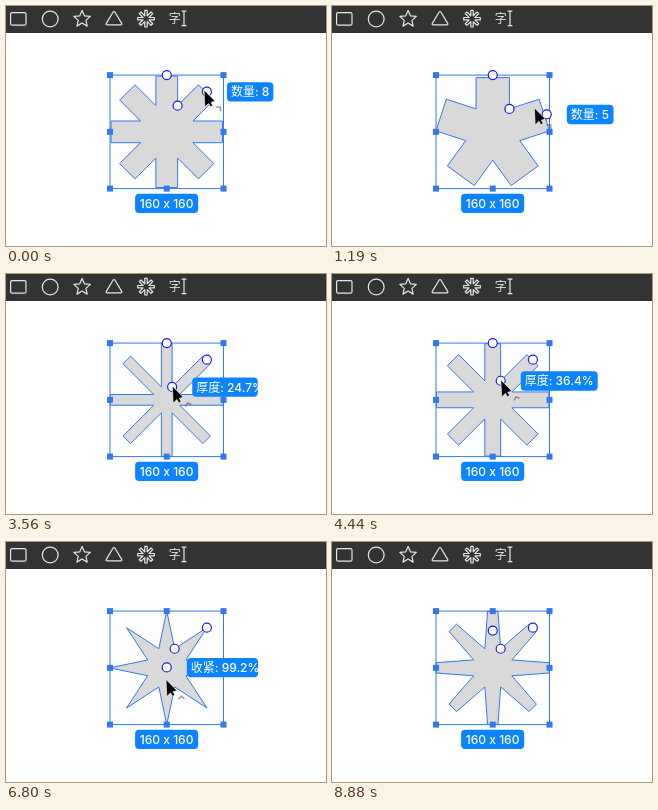
An HTML page for the animation above (9.19 s loop, 320 by 240 pixels).

```html
<!DOCTYPE html>
<html lang="zh">
<head>
<meta charset="utf-8">
<title>Asterisk shape handles</title>
<style>
  html, body { margin: 0; width: 100%; height: 100%; overflow: hidden; background: #fff; }
  svg { display: block; width: 320px; height: 240px; }
  text { font: 500 12px Inter, "Noto Sans CJK SC", "Noto Sans CJK", sans-serif; fill: #fff; }
  .tools { fill: none; stroke: #e6e6e6; stroke-width: 1.2; stroke-linejoin: round; }
  .tools text { font-size: 12px; fill: #e6e6e6; stroke: none; }
  .shape { fill: #d9d9d9; stroke: #3378f0; }
  .frame { fill: none; stroke: #3378f0; }
  .square { fill: #3378f0; }
  .knob { fill: #fff; stroke: #1c1ce8; stroke-width: 1.2; }
  .tag { fill: #0d84ff; }
  .arrow { fill: #000; stroke: #fff; stroke-width: .6; }
  .mark { fill: none; stroke: #444; stroke-width: 1.5; }
</style>
</head>
<body>
<svg viewBox="0 0 320 240">
  <rect width="320" height="27" fill="#333"/>
  <g class="tools">
    <rect x="4.6" y="6.6" width="15.4" height="12.6" rx="1.5"/>
    <circle cx="44.2" cy="13" r="7.9"/>
    <path id="star"/>
    <path d="M107 6.2Q108 4.8 109 6.2L115.7 17.4Q116.3 18.8 114.8 18.8H101.2Q99.7 18.8 100.3 17.4Z"/>
    <path id="burst"/>
    <text x="162.8" y="17">字</text>
    <path d="M175.6 5.2H180.4M178 5.2V19.6M175.6 19.6H180.4"/>
  </g>
  <path id="shape" class="shape"/>
  <rect class="frame" x="104" y="69.1" width="113.5" height="113.5"/>
  <g id="squares"></g>
  <rect class="tag" x="129.1" y="187.7" width="63.1" height="19.4" rx="4"/>
  <text x="160.6" y="202" text-anchor="middle">160 x 160</text>
  <g id="tip">
    <rect id="tipBox" class="tag" height="19.4" rx="4"/>
    <text id="tipText" x="4" y="14.2"></text>
  </g>
  <g id="knobs"></g>
  <g id="cursor">
    <path class="arrow" d="M0 0L.8 17L4.6 13.4L6.6 16.8L8.7 15.6L7 12.2L11 11.2Z"/>
    <path id="mark" class="mark"/>
  </g>
</svg>
<script>
const LOOP = 9190, STEP = 147.6, LAST = 60;
const CX = 160.75, CY = 125.85, R = 56.75;
const $ = id => document.getElementById(id);
const set = (el, attrs) => { for (const k in attrs) el.setAttribute(k, attrs[k]); };
const add = (parent, name, attrs) => {
  const el = document.createElementNS(parent.namespaceURI, name);
  set(el, attrs);
  return parent.appendChild(el);
};
const polar = (r, a, x = CX, y = CY) => [x + r * Math.sin(a), y - r * Math.cos(a)];
const toPath = points => 'M' + points.map(p => p.map(v => v.toFixed(2))).join('L') + 'Z';

function asterisk(n, thick, tight, x = CX, y = CY, radius = R) {
  const inner = radius * thick, half = Math.PI / n;
  const spread = Math.asin(inner * Math.sin(half) * (1 - tight) / radius);
  const points = [];
  for (let i = 0; i < n; i++) {
    const a = 2 * half * i;
    points.push(polar(radius, a - spread, x, y), polar(radius, a + spread, x, y),
      polar(inner, a + half, x, y));
  }
  return toPath(points);
}

set($('star'), { d: asterisk(5, .46, 1, 76.1, 13.1, 8.7) });
set($('burst'), { d: asterisk(8, .38, 0, 140, 12.7, 8.4) });
for (const i of [0, 1, 2]) for (const j of [0, 1, 2])
  if (i !== 1 || j !== 1)
    add($('squares'), 'rect', {
      class: 'square', x: 101 + i * R, y: 66.1 + j * R, width: 6, height: 6
    });
const knobs = [0, 1, 2].map(() => add($('knobs'), 'circle', { class: 'knob', r: 4.5 }));

// Eases through [step, value] keys and holds the end values.
function ease(k, keys) {
  if (k <= keys[0][0]) return keys[0][1];
  for (let i = 1; i < keys.length; i++) {
    const [k0, v0] = keys[i - 1], [k1, v1] = keys[i];
    if (k < k1) {
      const u = (k - k0) / (k1 - k0);
      return v0 + (v1 - v0) * u * u * (3 - 2 * u);
    }
  }
  return keys.at(-1)[1];
}
const glide = (k, k0, from, k1, to) =>
  from.map((v, i) => ease(k, [[k0, v], [k1, to[i]]]));
const percent = v => Math.round(Math.min(100, v) * 10) / 10;

// The count is dragged down and back in one cosine swing.
const swing = k => k < 12 ? (1 - Math.cos(Math.PI * k / 6)) / 2 : 0;
const sweep = k => polar(56 - 10.6 * swing(k), .728 + .428 * swing(k));
const thickness = k => percent(ease(k, [[21, 50], [25, 20], [28, 36.4]]));
// The pull runs past the centre, so the shown value is capped.
const pull = k => ease(k, [[37, 0], [38, 1.4], [39, 0], [45, 107.1], [51, 0], [57, 34.3]]);
const pullCursor = k => [160, 72 + .66 * pull(k)];

function pose(k) {
  const n = Math.round(8 - 4 * swing(k)), thick = thickness(k), tight = percent(pull(k));
  const top = [CX, CY - R * (1 - tight / 100)];
  const inner = polar(R * thick / 100, Math.PI / n);
  const outer = polar(R, 2 * Math.PI / n);
  const grip = [inner[0] + .2, inner[1] - .8];
  const p = { n, thick, tight, top, inner, outer };
  if (k < 15) return { ...p, cursor: sweep(k), anchor: outer, text: `数量: ${n}`, turn: 45 };
  if (k < 22) return { ...p, cursor: glide(k, 14, sweep(14), 20, grip) };
  if (k < 31) return { ...p, cursor: grip, anchor: inner, text: `厚度: ${thick}%`, turn: -20 };
  if (k < 34) return { ...p, cursor: glide(k, 30, grip, 34, pullCursor(34)) };
  if (k < 58) return {
    ...p, cursor: pullCursor(k), anchor: top, text: `收紧: ${tight}%`, turn: k < 36 ? null : 0
  };
  return { ...p, cursor: glide(k, 57, pullCursor(57), 60, [170, 260]) };
}

function textWidth(text) {
  $('tipText').textContent = text;
  return $('tipText').getComputedTextLength();
}

function draw(k) {
  const p = pose(k);
  set($('shape'), { d: asterisk(p.n, p.thick / 100, p.tight / 100) });
  [p.top, p.inner, p.outer].forEach(([cx, cy], i) => set(knobs[i], { cx, cy }));

  set($('tip'), { visibility: p.text ? 'visible' : 'hidden' });
  if (p.text) {
    // The box follows the text one step late.
    const width = textWidth(pose(Math.max(0, k - 1)).text || p.text) + 8;
    set($('tipBox'), { width });
    $('tipText').textContent = p.text;
    set($('tip'), { transform: `translate(${p.anchor[0] + 20.1} ${p.anchor[1] - 9.5})` });
  }

  set($('cursor'), { transform: `translate(${p.cursor})` });
  const idle = p.turn == null;
  set($('mark'), {
    d: idle ? 'M-4 0H4M0 -4V4' : 'M-3 1.5L0 -1.2L3 1.5',
    transform: `translate(15.5 18) rotate(${idle ? 0 : p.turn})`,
    opacity: idle ? 1 : .55
  });
}

let shown = -1;
const start = performance.now();
function tick() {
  const time = (performance.now() - start) % LOOP;
  const k = Math.min(LAST, Math.floor(time / STEP));
  if (k !== shown) draw(shown = k);
  requestAnimationFrame(tick);
}
tick();
</script>
</body>
</html>
```
